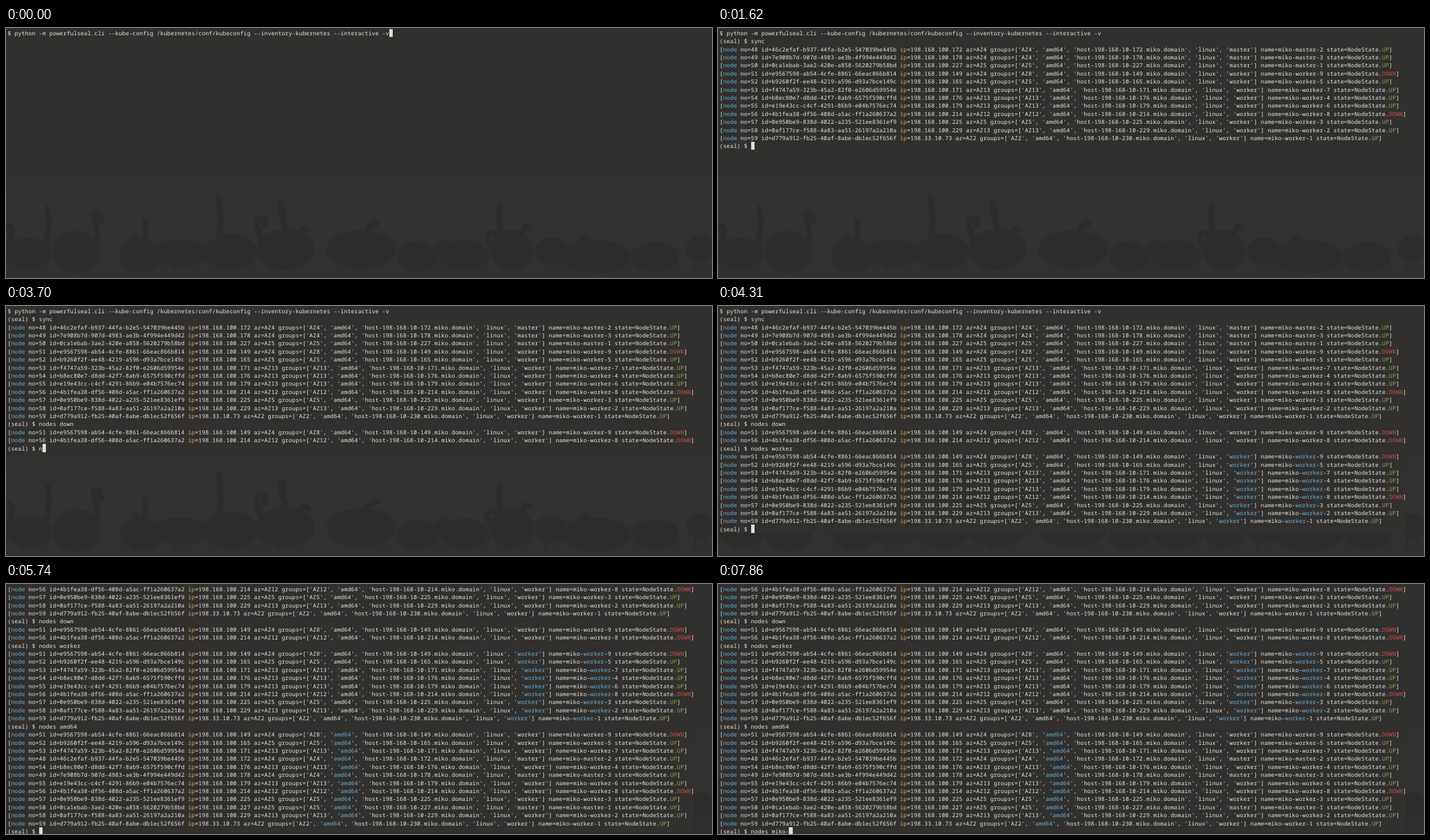
Recreate the animation shown at these times as an HTML page. Size 1256 by 446 pixels, loop 8 s.

```html
<!DOCTYPE html>
<html lang="en">
<head>
<meta charset="utf-8">
<title>Terminal session</title>
<style>
  html, body { margin: 0; width: 100%; height: 100%; overflow: hidden; background: #31302e; }
  #stage { position: relative; width: 1256px; height: 446px; overflow: hidden; }
  #stage > * { position: absolute; }
  #birds { left: 0; top: 0; }
  #cover { left: 5px; top: 0; width: 1218px; background: #31302e; }
  #text {
    left: 3px; top: 1.8px; margin: 0; color: #e8e7e0;
    font: 500 10px/14.4px "Noto Sans Mono", "DejaVu Sans Mono", monospace;
    letter-spacing: .17px; font-variant-ligatures: none;
    text-rendering: geometricPrecision; white-space: pre;
  }
  #cursor { width: 6.17px; height: 14.4px; background: #dddcd6; }
  .blue { color: #6fb0d8; }
  .ip { color: #e0a550; }
  .up { color: #9aa548; }
  .down { color: #cc4f49; }
</style>
</head>
<body>
<div id="stage">
  <svg id="birds" width="1256" height="446">
    <defs>
      <linearGradient id="sky" x1="0" y1="0" x2="0" y2="1">
        <stop offset="0" stop-color="#31302e"/>
        <stop offset=".5" stop-color="#333230"/>
        <stop offset="1" stop-color="#31302e"/>
      </linearGradient>
    </defs>
    <rect y="250" width="1256" height="196" fill="url(#sky)"/>
    <g id="bodies" fill="#2d2c2a"></g>
    <path id="legs" fill="none" stroke="#2d2c2a" stroke-width="2"/>
    <path fill="none" stroke="#2d2c2a" stroke-width="10" stroke-linecap="round" stroke-linejoin="round"
      d="M72 385Q78 350 74 320M160 385C170 355 143 330 163 327L171 345M248 385V346M232 390L230 372
         M378 375Q386 340 377 301M460 385C440 355 443 333 462 339L460 352M500 368C494 340 480 316 490 312L494 328
         M5 385Q18 355 3 353M640 368Q648 345 661 349M880 365Q876 335 879 318M872 400C848 380 855 360 870 367
         M915 372Q925 346 933 358M772 402Q764 380 781 381M520 368Q530 350 538 362M1018 390Q1022 368 1036 378"/>
  </svg>
  <div id="cover"></div>
  <pre id="text"></pre>
  <div id="cursor"></div>
</div>
<script>
const LOOP = 8000, CELL = 6.17, ROW = 14.4, LEFT = 3, TOP = 1.5, ROWS = 31;
const $ = id => document.getElementById(id);

// Background flock: centre and radii of each body
const bodies = [
  [40, 402, 42, 28], [125, 400, 42, 38], [240, 406, 38, 30], [310, 402, 50, 25],
  [400, 400, 48, 32], [497, 395, 52, 37], [632, 395, 62, 35], [732, 408, 36, 28],
  [815, 406, 46, 27], [900, 396, 38, 36], [970, 398, 30, 25], [1050, 408, 62, 30],
  [1155, 408, 43, 27], [1236, 393, 26, 23]
];
$("bodies").innerHTML = bodies.map(([x, y, rx, ry]) =>
  `<ellipse cx="${x}" cy="${y}" rx="${rx}" ry="${ry}"/>`).join("");
$("legs").setAttribute("d", bodies.map(([x, y]) => `M${x - 8} ${y}L${x - 12} 446M${x + 6} ${y}V446`).join(""));

// no, id, last part of the address, zone, name
const nodes = {};
`48 46c2efaf-b937-44fa-b2e5-547039be445b 172 AZ4 master-2
49 7e908b7d-907d-4983-ae3b-4f994e449d42 178 AZ4 master-3
50 0ca1ebab-3ae2-420e-a858-5620279b58bd 227 AZ5 master-1
51 e9567598-ab54-4cfe-8861-66eac866b814 149 AZ4 worker-9
52 b9260f2f-ee48-4219-a596-d93a7bce149c 165 AZ5 worker-5
53 f4747a59-323b-45a2-82f0-e2606d59954e 171 AZ13 worker-7
54 b8ec80e7-d8dd-42f7-8ab9-6575f590cffd 176 AZ13 worker-4
55 e19e43cc-c4cf-4291-86b9-e04b7576ec74 179 AZ13 worker-6
56 4b1fea38-df56-408d-a5ac-ff1a260637a2 214 AZ12 worker-8
57 0e950be9-838d-4022-a235-521ee8361ef9 225 AZ5 worker-3
58 0af177ce-f588-4a83-aa51-26197a2a210a 229 AZ13 worker-2
59 d779a912-fb25-40af-8abe-db1ec52f656f 230 AZ2 worker-1`.split("\n").forEach(line => {
  const [no, id, host, zone, name] = line.split(" ");
  const ip = no === "59" ? "198.33.10.73" : "198.168.100." + host;
  const group = no === "51" ? "AZ8" : zone;
  const state = no === "51" || no === "56" ? "DOWN" : "UP";
  nodes[no] = { no, id, host, zone, name, ip, group, state };
});

const paint = (cls, s) => `<span class="${cls}">${s}</span>`;

function nodeLine(n, match) {
  const role = n.name.split("-")[0];
  let info = ` no=${n.no} id=${n.id} ${paint("ip", "ip")}=${n.ip} az=${n.zone} groups=['${n.group}', 'amd64', ` +
    `'host-198-168-10-${n.host}.miko.domain', 'linux', '${role}'] name=miko-${n.name} state=NodeState.`;
  if (match) info = info.replaceAll(match, paint("blue", match));
  return "[" + paint("blue", "node") + info + paint(n.state.toLowerCase(), n.state) + "]";
}
const list = (order, match) => order.map(no => nodeLine(nodes[no], match));

const PROMPT = "(seal) $ ";
const COMMAND = "$ python -m powerfulseal.cli --kube-config /kubernetes/conf/kubeconfig --inventory-kubernetes --interactive -v";
const log = [
  COMMAND,
  PROMPT + "sync", ...list(Object.keys(nodes)),
  PROMPT + "nodes down", ...list([51, 56]),
  PROMPT + "nodes worker", ...list([51, 52, 53, 54, 55, 56, 57, 58, 59], "worker"),
  PROMPT + "nodes amd64", ...list([51, 52, 53, 48, 54, 49, 55, 56, 57, 50, 58, 59], "amd64")
];

// Each step: time, finished lines, typed text (none while a command runs)
const steps = [
  [0, 0, COMMAND], [280, 1], [900, 1, ""],
  [1180, 1, "s"], [1240, 1, "sy"], [1310, 1, "sync"], [1380, 2],
  [1620, 14, ""], [2340, 14, "n"], [2380, 14, "nod"], [2420, 14, "nodes"],
  [2620, 14, "nodes "], [2740, 14, "nodes d"], [2860, 14, "nodes do"],
  [2980, 14, "nodes dow"], [3010, 14, "nodes down"], [3040, 15], [3070, 17], [3100, 17, ""],
  [3700, 17, "n"], [3740, 17, "nod"], [3800, 17, "nodes"], [3880, 17, "nodes "],
  [3940, 17, "nodes w"], [4000, 17, "nodes wor"], [4160, 17, "nodes worker"], [4235, 18],
  [4310, 27, ""], [4670, 27, "no"], [4790, 27, "nodes"],
  [5030, 27, "nodes "], [5065, 27, "nodes a"], [5100, 27, "nodes am"],
  [5380, 27, "nodes amd"], [5460, 27, "nodes amd64"],
  [5740, 40, ""], [6740, 40, "n"], [6790, 40, "nod"],
  [7470, 40, "node"], [7525, 40, "nodes"], [7580, 40, "nodes "], [7635, 40, "nodes m"],
  [7690, 40, "nodes mi"], [7745, 40, "nodes mik"], [7800, 40, "nodes miko"], [7860, 40, "nodes miko-"]
];

let shown;
function show(step) {
  const [, done, typed] = step;
  const input = typed === undefined ? "" : (done ? PROMPT : "") + typed;
  const first = Math.max(0, done + 1 - ROWS);
  const y = TOP + (done - first) * ROW;
  $("text").innerHTML = [...log.slice(first, done), input].join("\n");
  $("cursor").style.left = LEFT + input.length * CELL + "px";
  $("cursor").style.top = y + "px";
  $("cover").style.height = y + ROW + "px";
}

function frame() {
  const t = performance.now() % LOOP;
  const step = steps.findLast(s => s[0] <= t);
  if (step !== shown) show(shown = step);
  requestAnimationFrame(frame);
}
frame();
</script>
</body>
</html>
```
